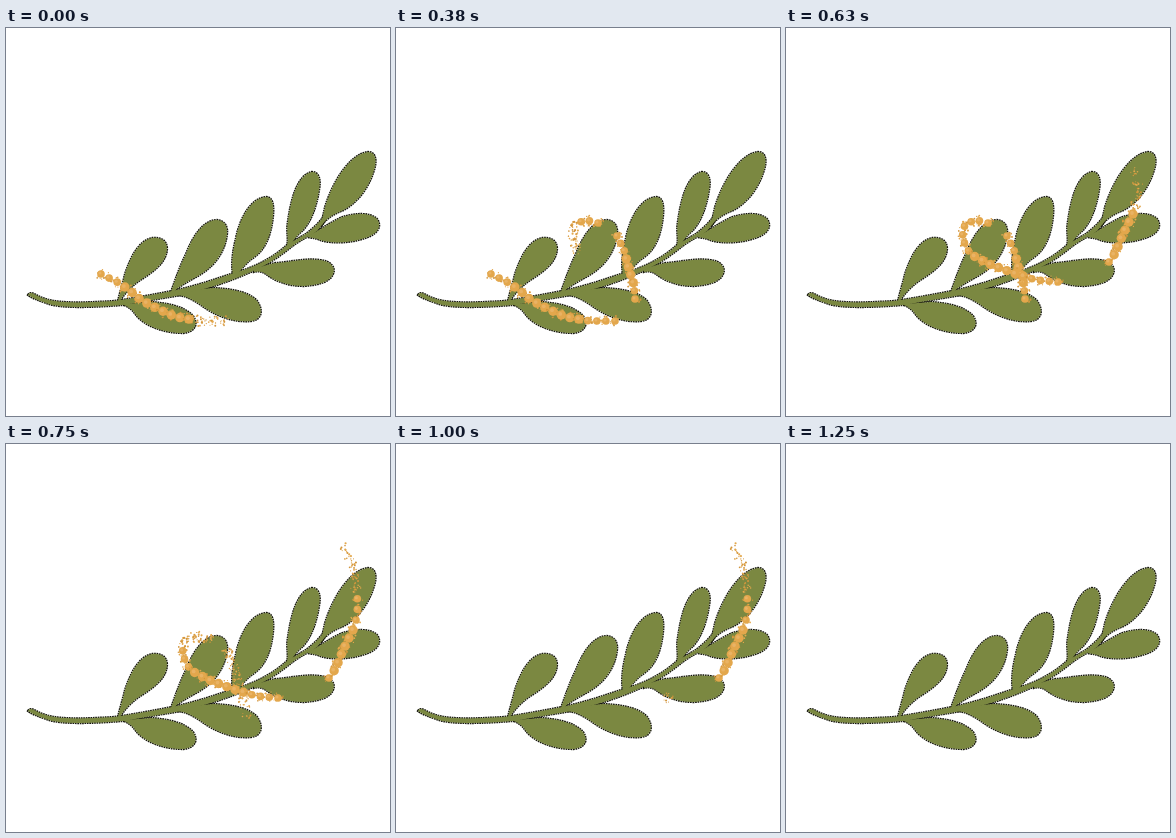
An HTML page with a canvas for the animation above (1.76 s loop, 384x388 px).

```html
<!DOCTYPE html>
<html lang="en">
<head>
<meta charset="utf-8">
<title>Branch with a golden trail</title>
<style>
  html, body { margin: 0; width: 100%; height: 100%; overflow: hidden; background: #fff; }
  svg, canvas { position: absolute; left: 0; top: 0; width: 384px; height: 388px; }
  .edge { fill: none; stroke: #15160a; stroke-width: 2.3; stroke-dasharray: 1.7 .7; }
  .body { fill: #7b8841; }
</style>
</head>
<body>
<svg viewBox="0 0 384 388">
  <defs>
    <g id="branch">
      <path d="M22 267C24 263 28 266 32 268C48 276 72 275 108 273C130 270 150 266 166 263C190 258 210 251 228 245C250 239 268 229 281 217C290 211 300 207 306 201C311 197 315 192 318 188L320 190C317 196 313 202 307 206C298 210 290 215 284 220C270 231 256 240 240 246C222 254 200 261 176 267C150 271 130 275 117 277C90 279 55 281 40 275C32 272 26 270 22 267Z"/>
      <path d="M112 273C114 264 117 255 119 246C124 231 132 213 146 210C154 209 161 212 161 221C160 238 141 247 130 255C124 260 117 267 114 273Z"/>
      <path d="M165 264C170 250 174 238 180 226C187 208 197 193 210 192C218 192 222 198 221 206C219 225 207 240 190 249C181 254 173 258 168 264Z"/>
      <path d="M227 247C225 235 227 222 230 210C234 190 245 170 260 169C267 169 268 178 267 188C265 208 259 222 247 230C241 234 236 240 231 247Z"/>
      <path d="M281 218C283 210 280 204 282 193C285 172 291 147 306 144C313 144 315 152 313 162C310 182 303 197 295 204C290 208 287 213 285 217Z"/>
      <path d="M316 193C318 184 319 177 323 168C330 150 345 126 362 124C370 124 371 133 368 142C362 163 347 179 333 184C326 187 320 191 316 197Z"/>
      <path d="M302 208C312 203 322 196 334 190C347 185 364 184 371 191C376 198 372 205 362 209C347 215 327 216 314 212C310 210 306 210 302 209Z"/>
      <path d="M248 242C256 238 262 236 270 235C285 234 298 230 314 232C325 233 330 240 327 246C324 254 312 257 298 258C280 258 268 252 260 246C256 243 252 243 248 244Z"/>
      <path d="M172 266C184 264 196 260 208 260C224 261 242 263 251 273C258 283 255 292 245 293C226 295 207 286 195 277C188 272 180 268 172 267Z"/>
      <path d="M118 276C128 275 136 275 145 274C160 275 178 278 187 288C193 297 188 304 177 305C158 305 139 298 130 287C127 282 123 279 118 277Z"/>
    </g>
  </defs>
  <use href="#branch" class="edge"/>
  <use href="#branch" class="body"/>
</svg>
<canvas width="384" height="388"></canvas>
<script>
const LOOP = 1760;
const GOLD = '#e3a74c', DARK = '#d2953c';
const ctx = document.querySelector('canvas').getContext('2d');

// The visible strands of the trail: waypoints and bead count.
const strands = [
  { n: 16, pts: [[95,246],[111,254],[122,261],[135,272],[152,281],[170,289],[194,293],[219,293]] },
  { n: 9,  pts: [[239,271],[238,257],[232,238],[228,222],[221,208]] },
  { n: 18, pts: [[202,195],[190,192],[179,196],[176,210],[184,226],[203,236],[230,246],[250,252],[272,254]] },
  { n: 7,  pts: [[323,234],[330,224],[335,211],[340,200],[347,186]] },
  { n: 8,  pts: [[350,176],[352,160],[350,144],[347,122],[339,103]] }
];

// Start time, then bead indices: tail end, solid from, solid to, head end.
const steps = [
  [0, 0, 0, 11, 15],
  [130, 0, 0, 15, 18],
  [250, 0, 0, 21, 24],
  [380, 0, 0, 27, 31],
  [500, 0, 3, 38, 42],
  [630, 16, 16, 49, 53],
  [750, 16, 29, 52, 57],
  [880, 28, 35, 52, 57],
  [1000, 42, 43, 52, 57],
  [1130, 45, 50, 52, 57],
  [1250, 1, 1, 0, 0]
];

function random(seed) {
  const v = Math.sin(seed * 12.9898 + 4.1) * 43758.5453;
  return v - Math.floor(v);
}

function spread({ n, pts }) {
  const sums = [0];
  for (let i = 1; i < pts.length; i++) {
    sums.push(sums[i - 1] + Math.hypot(pts[i][0] - pts[i - 1][0], pts[i][1] - pts[i - 1][1]));
  }
  const total = sums[sums.length - 1];
  return Array.from({ length: n }, (_, k) => {
    const d = total * k / (n - 1);
    let i = 1;
    while (i < pts.length - 1 && sums[i] < d) i++;
    const f = (d - sums[i - 1]) / (sums[i] - sums[i - 1]);
    return [0, 1].map(a => pts[i - 1][a] + (pts[i][a] - pts[i - 1][a]) * f);
  });
}

const beads = strands.flatMap(spread);

function beadSize(i) {
  const thick = (i > 2 && i < 12) || (i > 17 && i < 22) || (i > 31 && i < 39) || (i > 43 && i < 50);
  return thick ? 4.7 : 3.8;
}

function dot(x, y, r, color) {
  ctx.fillStyle = color;
  ctx.beginPath();
  ctx.arc(x, y, r, 0, Math.PI * 2);
  ctx.fill();
}

function crumbs(i, count, reach) {
  const [x, y] = beads[i];
  for (let k = 0; k < count; k++) {
    const s = i * 31 + k * 3;
    const a = random(s) * Math.PI * 2, d = reach * Math.sqrt(random(s + 1));
    dot(x + Math.cos(a) * d, y + Math.sin(a) * d, .5 + random(s + 2) * .6, k % 2 ? GOLD : DARK);
  }
}

function bead(i) {
  const [x, y] = beads[i], r = beadSize(i);
  crumbs(i, 9, r + 1.8);
  dot(x, y, r, GOLD);
  dot(x - 1, y - 1, r * .4, '#e9b365');
}

function draw([, tail, from, to, head]) {
  ctx.clearRect(0, 0, 384, 388);
  for (let i = tail; i <= head; i++) {
    if (i >= from && i <= to) {
      bead(i);
    } else {
      const fade = i < from ? (i - tail + 1) / (from - tail + 1) : (head - i + 1) / (head - to + 1);
      crumbs(i, Math.round(6 + 14 * fade), 5.5);
    }
  }
}

let shown;
function tick() {
  const t = performance.now() % LOOP;
  const step = steps.findLast(s => s[0] <= t);
  if (step !== shown) draw(shown = step);
  requestAnimationFrame(tick);
}
tick();
</script>
</body>
</html>
```
